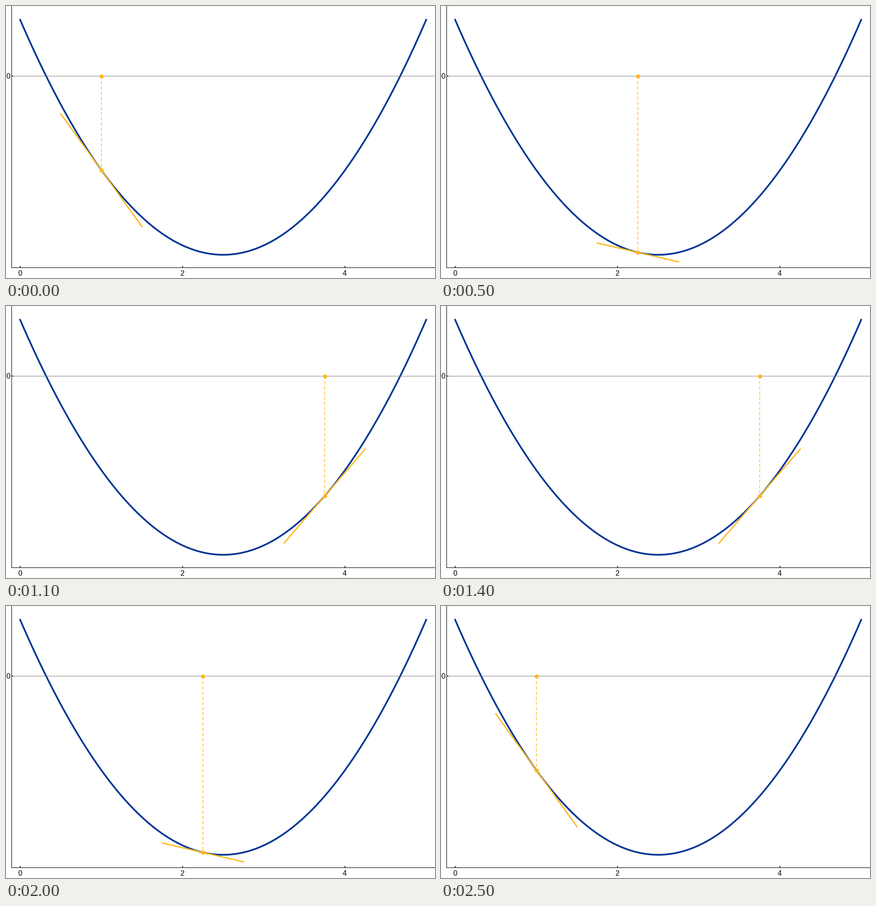
Animation, 939 px wide and 596 px high, one loop 2.6 s. Source, as a matplotlib script:

```python
import numpy as np
import matplotlib.pyplot as plt
from matplotlib.animation import FuncAnimation

W, H, DPI = 939, 596, 64
PX = 72 / DPI                    # points per pixel
BLUE, GOLD = "#003594", "#FFB81C"
X0, XU = 30.95, 177.75           # pixel of x = 0, pixels per unit
Y0, YU = 153.75, 82.4
AXIS_X, AXIS_Y = 12.4, 573.4
STEPS, START, STEP = 12, 1.0, 0.25
FRAMES = 2 * (STEPS + 1)


def f(x):
    return x * x - 5 * x + 1.5


def slope(x):
    return 2 * x - 5


def sx(x):
    return X0 + XU * np.asarray(x, float)


def sy(y):
    return Y0 - YU * np.asarray(y, float)


fig = plt.figure(figsize=(W / DPI, H / DPI), dpi=DPI, facecolor="white")
ax = fig.add_axes([0, 0, 1, 1])
ax.set_xlim(0, W)
ax.set_ylim(H, 0)
ax.axis("off")


def line(xs, ys, color, width, z, cap="projecting", **kw):
    return ax.plot(xs, ys, color=color, lw=width * PX, zorder=z, snap=False,
                   solid_capstyle=cap, dash_capstyle=cap, **kw)[0]


def label(x, y, text):
    ax.text(x, y, text, family="Liberation Sans", size=16 * PX,
            color="black", ha="center", va="baseline")


# Static plot
xs = np.linspace(0, 5, 101)
line(sx(xs), sy(f(xs)), BLUE, 3.7, 2)
line([AXIS_X, W], [Y0, Y0], "#808080", 1.07, 3, cap="butt")
line([AXIS_X, AXIS_X], [0, AXIS_Y], "#222222", 1.3, 1)
line([AXIS_X, W], [AXIS_Y, AXIS_Y], "#222222", 1.3, 1)
line([AXIS_X, AXIS_X + 3.8], [Y0 - 0.3, Y0 - 0.3], "black", 1.6, 4, cap="butt")
label(4.6, 159, "0")
for v in (0, 2, 4):
    line([sx(v)] * 2, [AXIS_Y - 3.8, AXIS_Y], "black", 1.6, 4, cap="butt")
    label(sx(v) - 0.5, 591, str(v))

# Moving parts
drop = line([], [], GOLD, 1.42, 5, dashes=(4, 4))
tangent = line([], [], GOLD, 2.8, 6)
dots = line([], [], GOLD, 0, 7, marker="o", ms=9 * PX, mew=0)


def update(i):
    k = i if i <= STEPS else FRAMES - 1 - i
    x = START + STEP * k
    ends = np.array([-0.5, 0.5])
    tangent.set_data(sx(x + ends), sy(f(x) + slope(x) * ends))
    pair = sx([x, x]), sy([0, f(x)])
    drop.set_data(*pair)
    dots.set_data(*pair)
    return drop, tangent, dots


anim = FuncAnimation(fig, update, frames=FRAMES, interval=100,
                     repeat=True, repeat_delay=0, blit=False)
plt.show()
```
